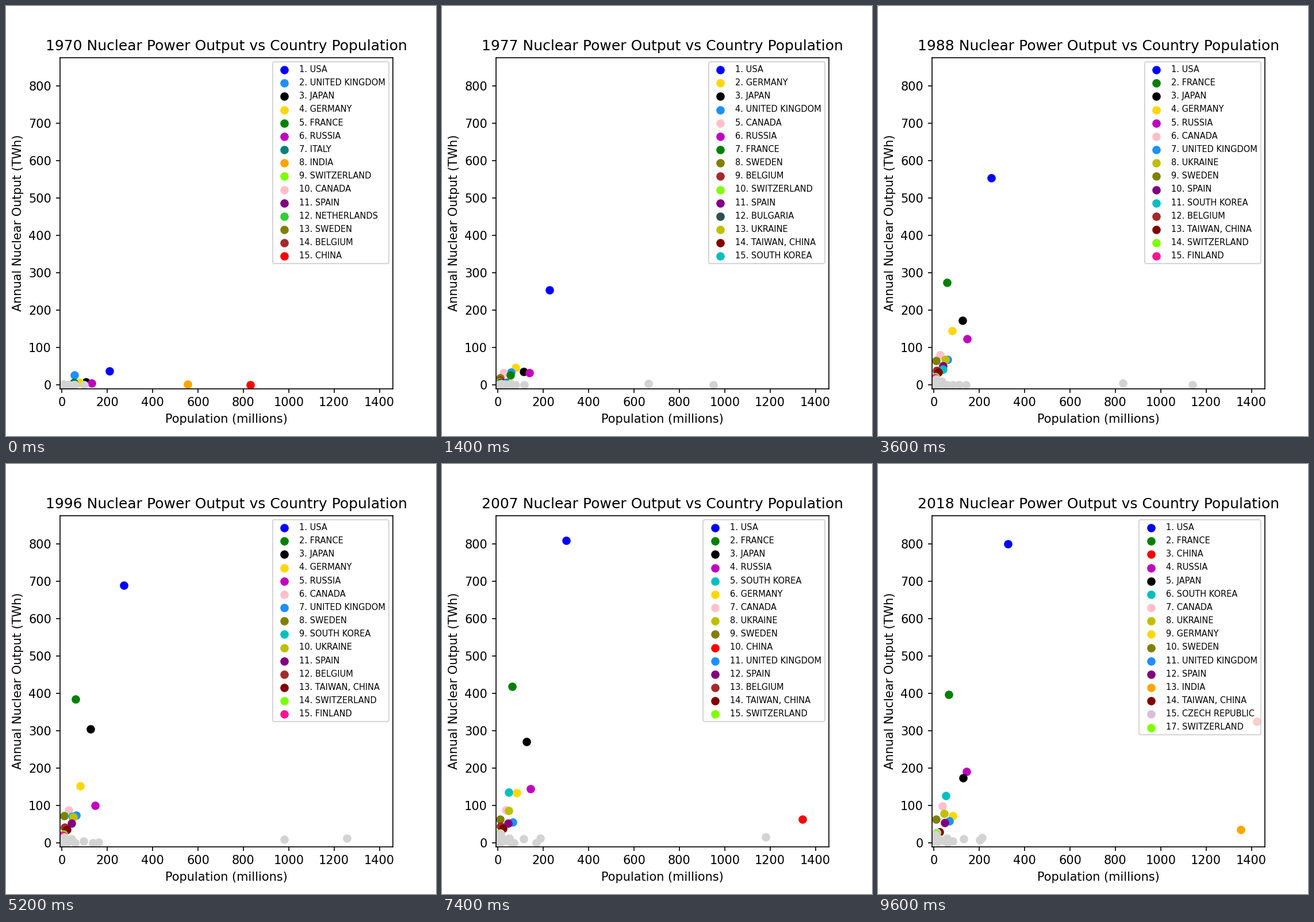
Animation, 748 px wide and 748 px high, one loop 9.8 s. Source, as a matplotlib script:

```python
import numpy as np
import matplotlib.pyplot as plt
from matplotlib.animation import FuncAnimation

FIRST, LAST = 1970, 2018
STEP_MS = 200
SIZE, DPI = 748, 150
TOP = 15
ALWAYS_SHOWN = "SWITZERLAND"
OTHER = "lightgrey"

plt.rcParams["font.family"] = "DejaVu Sans"
fig, ax = plt.subplots(figsize=(SIZE / DPI, SIZE / DPI), dpi=DPI)
ax.set_xlim(-10, 1460)
ax.set_ylim(-10, 875)
ax.set_xlabel("Population (millions)")
ax.set_ylabel("Annual Nuclear Output (TWh)")
title = ax.set_title("")

countries = []


def through(points):
    """Straight segments through {year: value}; zero before the first."""
    return lambda year: np.interp(year, list(points), list(points.values()),
                                  left=0)


def trend(start, end):
    return through({FIRST: start, LAST: end})


def settle(start, level, pace=6):
    """Growth from zero in the start year that levels off."""
    return lambda year: level * (1 - np.exp(-max(0, year - start) / pace))


def add(pop, output, name=None, color=None):
    countries.append(dict(pop=pop, output=output, name=name, color=color,
                          dot=ax.scatter([], [])))


def major(name, color, pop, output):
    pop = through(pop) if isinstance(pop, dict) else trend(*pop)
    add(pop, through(output), name, color)


major("USA", "blue", (210, 326.5),
      {1970: 37, 1977: 254, 1988: 553, 1996: 688, 2007: 809, 2018: 800})
major("UNITED KINGDOM", "dodgerblue", (55.5, 66.5),
      {1970: 26, 1977: 34, 1988: 68.7, 1998: 75, 2007: 56, 2018: 58})
major("JAPAN", "black", {1970: 105, 1988: 125, 2018: 127.5},
      {1970: 8, 1977: 35, 1988: 173, 1996: 305, 2009: 264, 2018: 174})
major("GERMANY", "gold", (78, 82.5),
      {1970: 6.5, 1977: 47, 1988: 144, 1998: 155, 2008: 132, 2018: 72})
major("FRANCE", "green", (52, 66),
      {1970: 6, 1977: 26, 1988: 274, 1996: 385, 2006: 418, 2014: 418,
       2018: 396})
major("RUSSIA", "m", {1970: 131, 1988: 147, 2007: 144.5},
      {1970: 4.5, 1977: 33, 1988: 122.5, 1996: 100, 2018: 191})
major("ITALY", "teal", (54, 60.5), {1970: 3.4, 1986: 3.4, 1988: 0})
major("INDIA", "orange", {1970: 555, 1988: 834, 2007: 1180, 2018: 1354},
      {1970: 2, 1988: 4.5, 2007: 16, 2014: 34, 2018: 36})
major("SWITZERLAND", "chartreuse", (6, 8.5),
      {1970: 1.8, 1977: 8, 1985: 21, 2007: 26, 2018: 24.5})
major("CANADA", "pink", (21.5, 37.5),
      {1970: 1, 1977: 33.3, 1988: 79.5, 1996: 88, 2007: 88, 2014: 98})
major("SPAIN", "purple", (35, 48), {1970: 0.9, 1977: 6.5, 1987: 51, 2018: 54})
major("NETHERLANDS", "limegreen", (13, 17), {1970: 0.4, 1973: 3.6})
major("SWEDEN", "olive", (8, 10.2),
      {1970: 0.1, 1977: 19.5, 1988: 65.6, 1996: 72, 2007: 64})
major("BELGIUM", "brown", (9.7, 11.5),
      {1970: 0.05, 1974: 0.06, 1977: 12, 1988: 39.5, 2007: 45, 2018: 27.3})
major("CHINA", "red", {1970: 830, 1988: 1139, 1996: 1257, 2007: 1344, 2018: 1423},
      {1990: 0, 1996: 12.6, 2007: 64, 2014: 144.5, 2018: 325})
major("BULGARIA", "darkslategrey", (8.8, 7), {1974: 3, 1988: 16})
major("UKRAINE", "y", (52, 45.5),
      {1977: 5.3, 1988: 68, 1996: 69.5, 2007: 87, 2018: 78.5})
major("TAIWAN, CHINA", "maroon", (16, 24.5),
      {1977: 5, 1988: 34, 2014: 40.5, 2018: 30})
major("SOUTH KOREA", "c", (33, 52.5),
      {1977: 4.6, 1988: 41.8, 1996: 71, 2007: 136, 2014: 149, 2018: 126.5})
major("FINLAND", "deeppink", (4.6, 5.5), {1977: 2.5, 1983: 18, 2018: 22.5})
major("CZECH REPUBLIC", "thistle", (9.8, 10.6),
      {1985: 3, 2000: 13.5, 2007: 25, 2018: 28.3})

# Populous small producers, never highlighted.
add(trend(98, 213), settle(1995, 14))
add(trend(57, 202), settle(2008, 10))
add(trend(52, 131.5), settle(1992, 11.5))
add(trend(28.5, 82.5), settle(2010, 6))
add(trend(22, 57.5), settle(1980, 12))
add(trend(24, 44), settle(1974, 6.5))

# A crowd of little ones near the corner.
rng = np.random.default_rng(4)
for size in np.linspace(2, 20, 8):
    add(trend(size, 1.1 * size),
        settle(rng.uniform(1980, 1996), rng.uniform(4, 15)))


def update(frame):
    year = FIRST + frame
    title.set_text(f"{year} Nuclear Power Output vs Country Population")
    ranked = sorted(countries, key=lambda c: -c["output"](year))
    handles, labels = [], []
    for rank, c in enumerate(ranked, 1):
        shown = c["color"] and (rank <= TOP or c["name"] == ALWAYS_SHOWN)
        dot = c["dot"]
        dot.set_offsets([(c["pop"](year), c["output"](year))])
        dot.set_color(c["color"] if shown else OTHER)
        dot.set_zorder(1 + rank / 100)
        if shown:
            handles.append(dot)
            labels.append(f"{rank}. {c['name']}")
    ax.legend(handles, labels, loc="upper right", fontsize=7,
              labelspacing=0.56)
    return []


anim = FuncAnimation(fig, update, frames=LAST - FIRST + 1, interval=STEP_MS,
                     init_func=lambda: update(0), repeat=True, repeat_delay=0,
                     blit=False)
plt.show()
```
